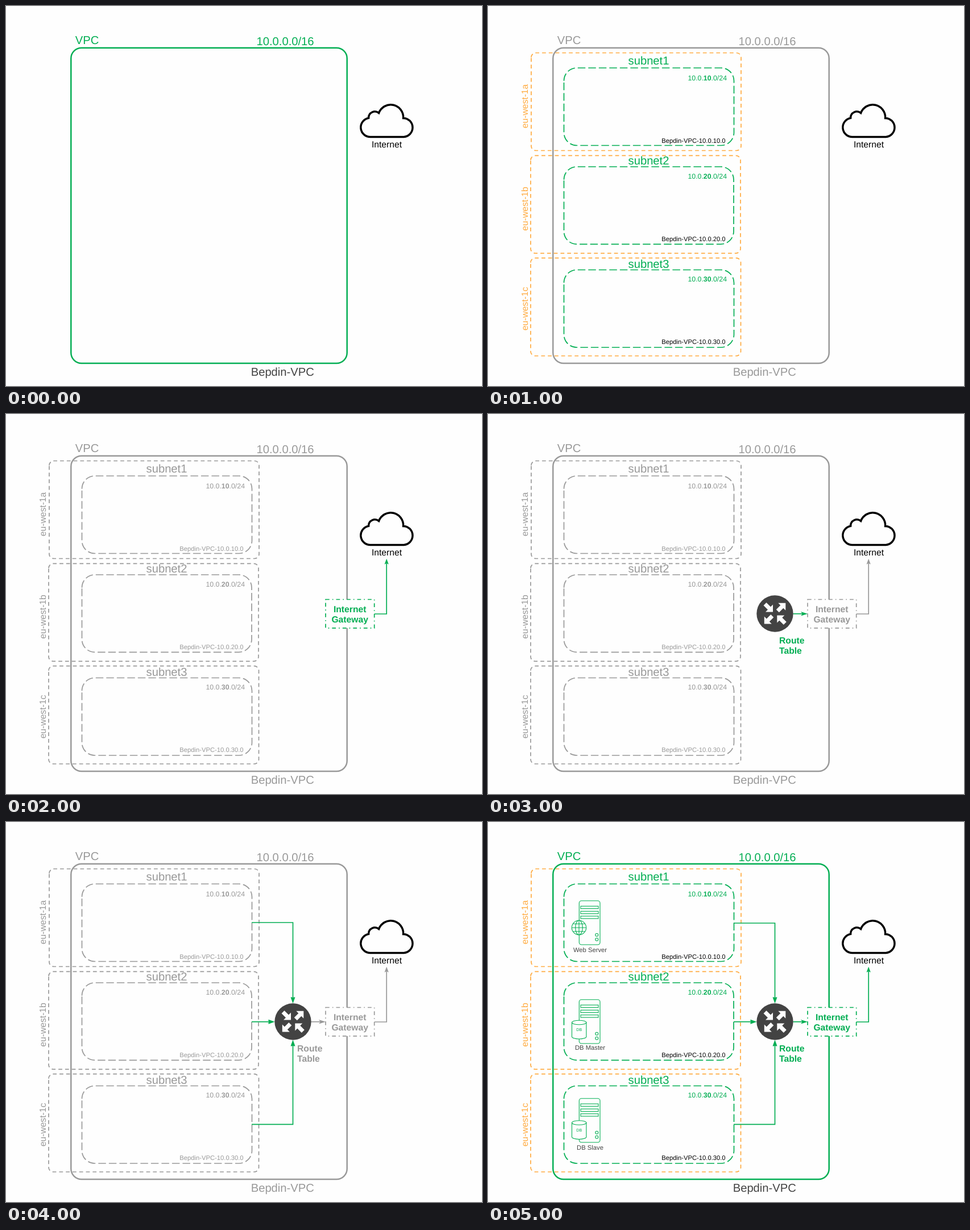
Animation, 837 px wide and 669 px high, one loop 6000 ms. Source, as an HTML page:

```html
<!DOCTYPE html>
<html lang="en">
<head>
<meta charset="utf-8">
<title>VPC build-up</title>
<style>
  html, body { margin: 0; width: 100%; height: 100%; overflow: hidden; background: #fefefe; }
  svg { display: block; font-family: "Liberation Sans", Arial, sans-serif; text-rendering: geometricPrecision; }
  text { fill: currentColor; }
  .line { fill: none; stroke: currentColor; stroke-width: 1.7; }
  .head { fill: currentColor; }
  .server { fill: #fefefe; stroke: currentColor; stroke-width: 1.1; }
</style>
</head>
<body>
<svg id="stage" width="837" height="669" viewBox="0 0 837 669"></svg>
<script>
const STEP = 1000;
const POINT = 1.122; // stage pixels per typographic point
const COLORS = { g: '#03ae53', x: '#999', o: '#ffab40', k: '#000', d: '#434343' };
const SIZE = { title: 18 * POINT, label: 14 * POINT, cidr: 11 * POINT, small: 10 * POINT };

// Dash pattern given in multiples of the line weight.
const dashes = (...units) => `stroke-dasharray="${units.map(u => u * 1.5 * POINT).join(' ')}"`;

const text = (x, y, size, content, attrs = '') =>
  `<text x="${x}" y="${y}" font-size="${size}" ${attrs}>${content}</text>`;
const middle = 'text-anchor="middle"', end = 'text-anchor="end"', bold = 'font-weight="bold"';

// Rounded box whose outline starts on the left side, so the dashes run from there.
function box(x, y, right, bottom, r, attrs = '') {
  const arc = (dx, dy) => `a${r} ${r} 0 0 1 ${dx} ${dy}`;
  return `<path class="line" ${attrs} d="M${x} ${y + r}${arc(r, -r)}H${right - r}${arc(r, r)}` +
    `V${bottom - r}${arc(-r, r)}H${x + r}${arc(-r, -r)}Z"/>`;
}

// Line through the points, ending in a head; notch > 0 gives a barbed head.
function arrow(points, length, half, notch = 0) {
  const [[px, py], [x, y]] = points.slice(-2);
  const angle = Math.atan2(y - py, x - px), reach = length - notch;
  const stop = [x - reach * Math.cos(angle), y - reach * Math.sin(angle)];
  return `<polyline class="line" points="${[...points.slice(0, -1), stop].join(' ')}"/>
    <path class="head" transform="translate(${x} ${y}) rotate(${angle * 180 / Math.PI})"
      d="M0 0L${-length} ${-half}L${-reach} 0L${-length} ${half}Z"/>`;
}

const subnets = [
  { n: 1, zone: 'a', box: [133.5, 109, 432.5, 245.5], zoneBox: [76, 82.5, 445, 254.5], zoneY: 176.5, titleY: 102.7, cidrY: 130.8, nameY: 240.5 },
  { n: 2, zone: 'b', box: [133.5, 283, 432, 419.3], zoneBox: [75, 263.3, 444, 435.3], zoneY: 357, titleY: 278.5, cidrY: 304.3, nameY: 414.2 },
  { n: 3, zone: 'c', box: [133.5, 464.5, 432.5, 601], zoneBox: [75, 443.7, 444.5, 616], zoneY: 533, titleY: 461, cidrY: 485.3, nameY: 594.8 },
];
const eachSubnet = draw => subnets.map(draw).join('');

function server(y, label, labelY) {
  const bars = [9.5, 18.5, 27].map(dy => `<rect x="163" y="${y + dy}" width="31" height="4.3"/>`).join('');
  const lamps = [60, 68].map(dy => `<circle cx="191.3" cy="${y + dy}" r="2.5"/>`).join('');
  return `<g class="server"><rect x="160.3" y="${y}" width="36.7" height="77.3" rx="4"/>${bars}${lamps}</g>` +
    text(179.5, labelY, SIZE.small, label, `${middle} style="fill:${COLORS.d}"`);
}

const globe = `<g class="server"><circle cx="160" cy="186" r="12.7"/><ellipse cx="160" cy="186" rx="6.3" ry="12.7"/>
  <path fill="none" d="M160 173.3v25.4M147.3 186h25.4M149.5 179.2h21M149.5 192.8h21"/></g>`;
const database = y => `<path class="server" d="M147.5 ${y}v25a12.7 4 0 0 0 25.4 0v-25"/>
  <ellipse class="server" cx="160.2" cy="${y}" rx="12.7" ry="3.8"/>` + text(160.2, y + 15.2, 7.2, 'DB', middle);

// Block arrow on the router disc, pointing down-right before rotation.
const blockArrow = (x, y, turn) =>
  `<path fill="#fefefe" transform="translate(${x} ${y}) rotate(${turn})"
    d="M0 0V-13L-4 -9L-11.5 -16.5L-16.5 -11.5L-9 -4L-13 0Z"/>`;
const router = `<circle cx="504.5" cy="351.5" r="32.2" fill="#434343"/>` +
  blockArrow(501, 348.5, 0) + blockArrow(523.3, 332.8, -90) +
  blockArrow(485.8, 369.5, 90) + blockArrow(508.3, 354.5, 180);

const topRoute = y => arrow([[432, y], [504.5, y], [504.5, 319.5]], 11, 4);

// Each part: one colour key per step ("-" hides it), then its drawing.
const parts = [
  ['gxxxxg', box(114.3, 73.7, 599.7, 629, 18.5, 'style="stroke-width:2.5"') +
    text(121.8, 66.8, SIZE.title, 'VPC') + text(440.5, 68.8, SIZE.title, '10.0.0.0/16')],
  ['dxxxxd', text(541.8, 651, SIZE.title, 'Bepdin-VPC', end)],
  ['-oxxxo', eachSubnet(s => box(...s.zoneBox, 8, dashes(4, 3)) +
    text(0, 0, SIZE.label, 'eu-west-1' + s.zone, `${middle} transform="translate(69.8 ${s.zoneY}) rotate(-90)"`))],
  ['-gxxxg', eachSubnet(s => box(...s.box, 22.7, dashes(8, 3)) +
    text(282.5, s.titleY, SIZE.title, 'subnet' + s.n, middle) +
    text(420, s.cidrY, SIZE.cidr, `10.0.<tspan ${bold}>${s.n}0</tspan>.0/24`, end))],
  ['-kxxxk', eachSubnet(s => text(417.6, s.nameY, SIZE.small, `Bepdin-VPC-10.0.${s.n}0.0`, end))],
  ['--gxxg', `<rect x="562" y="326.5" width="85.7" height="50.3" class="line" style="fill:#fefefe" ${dashes(4, 3, 1, 3)}/>` +
    text(604.7, 348.5, SIZE.label, 'Internet', middle + ' ' + bold) +
    text(604.7, 366.8, SIZE.label, 'Gateway', middle + ' ' + bold) +
    arrow([[647.7, 352], [669.2, 352], [669.2, 254.7]], 10, 3.7, 2)],
  ['---gxg', arrow([[536.5, 351.7], [562, 351.7]], 12, 3.8, 3) +
    text(512, 403.7, SIZE.label, 'Route', bold) + text(512, 422, SIZE.label, 'Table', bold)],
  ['----g-', topRoute(177)],
  ['-----g', topRoute(178)],
  ['----gg', arrow([[432, 351.7], [472.5, 351.7]], 11, 4) +
    arrow([[432, 532.3], [504.5, 532.3], [504.5, 383.5]], 11, 4)],
  ['---ddd', router],
  ['-----g', server(138.7, 'Web Server', 229.3) + globe +
    server(312.7, 'DB Master', 400.8) + database(353) +
    server(486.7, 'DB Slave', 577) + database(529.5)],
  ['kkkkkk', `<path class="line" style="stroke-width:3.5" transform="translate(.6 .4)" d="M641 230A16.75 16.75 0 0 1 637 196.8
    A11 11 0 0 1 655 188A22.2 22.2 0 0 1 698 197A16.52 16.52 0 0 1 699 230Z"/>` +
    text(669.5, 249.3, SIZE.label, 'Internet', middle)],
];

const stage = document.getElementById('stage');
stage.innerHTML = parts.map(([, drawing]) => `<g>${drawing}</g>`).join('');
const groups = [...stage.children];

function render(now) {
  const step = Math.floor(now / STEP) % 6;
  groups.forEach((group, i) => {
    const key = parts[i][0][step];
    group.style.display = key === '-' ? 'none' : '';
    group.style.color = COLORS[key] || '';
  });
}

const start = performance.now();
function tick() {
  render(performance.now() - start);
  requestAnimationFrame(tick);
}
tick();
</script>
</body>
</html>
```
